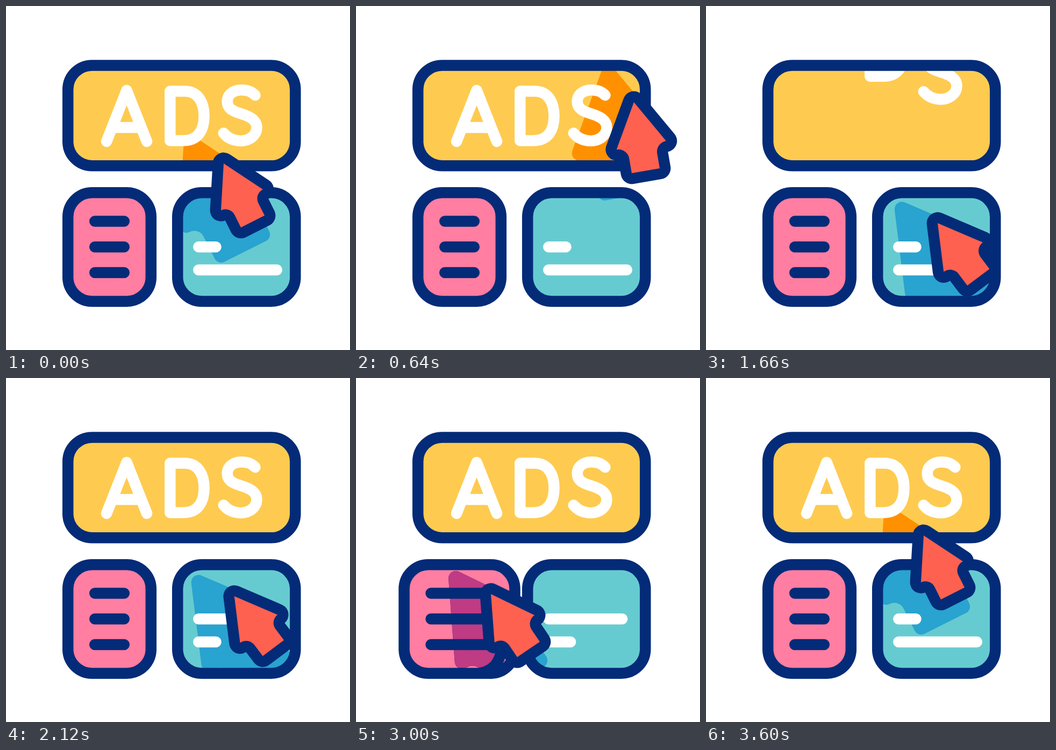
An HTML page that plays this animation: 640 px wide and 640 px high, repeating every 3620 ms.

```html
<!DOCTYPE html>
<html lang="en">
<head>
<meta charset="utf-8">
<title>Ads</title>
<style>
html, body { margin: 0; width: 100%; height: 100%; overflow: hidden; background: #fff; }
svg { display: block; width: 100vw; height: 100vh; }
.frame, .word, .bar { fill: none; stroke-width: 20.5; stroke-linecap: round; stroke-linejoin: round; }
.frame, .navy { stroke: #042b78; }
.word, .white { stroke: #fff; }
.shade { fill: currentColor; stroke: currentColor; stroke-width: 27.2; stroke-linejoin: round; }
</style>
</head>
<body>
<svg viewBox="0 0 640 640" role="img" aria-label="ADS">
  <defs>
    <rect id="banner" x="115.2" y="110.4" width="423.1" height="186.9" rx="45"/>
    <rect id="list" y="347.2" height="202.2" rx="45"/>
    <rect id="card" x="319.2" y="347.2" width="219.1" height="202.2" rx="45"/>
    <clipPath id="inBanner"><use href="#banner"/></clipPath>
    <clipPath id="inCard"><use href="#card"/></clipPath>
    <!-- The list shade keeps the resting outline while the list widens. -->
    <clipPath id="listEdge"><rect x="105" y="337" width="175" height="222.6" rx="55"/></clipPath>
    <clipPath id="listInside"><rect x="125.4" y="357.4" width="134.2" height="181.8" rx="35"/></clipPath>
    <path id="shadow"/>
  </defs>
  <rect width="640" height="640" fill="#fff"/>

  <use href="#banner" fill="#fecb50"/>
  <g clip-path="url(#inBanner)">
    <use href="#shadow" class="shade" color="#ff9100"/>
    <g class="word">
      <path class="letter" d="M187 252L224.5 157L262 252M199 226H250"/>
      <path class="letter" d="M305.3 158.5V250.5H330C358 250.5 368.5 230 368.5 205C368.5 180 358 158.5 332 158.5Z"/>
      <path class="letter" d="M463.5 166C457 159 447 156 436.5 156.3C421 157 411.5 166 411.7 178C412 190 420 195 436 200C456 206 466.5 213 466.5 226C466.5 241 452 251 437 251C423 251 412 245 404.8 236.5"/>
    </g>
  </g>
  <use href="#banner" class="frame"/>

  <use href="#list" fill="#ff7ea1"/>
  <g clip-path="url(#listEdge)"><use href="#shadow" class="shade" color="#042b78"/></g>
  <g clip-path="url(#listInside)"><use href="#shadow" class="shade" color="#bf3b84"/></g>
  <path id="rows" class="bar navy"/>
  <use href="#list" class="frame"/>

  <use href="#card" fill="#66cbd0"/>
  <g clip-path="url(#inCard)"><use href="#shadow" class="shade" color="#29a3cf"/></g>
  <path id="lines" class="bar white"/>
  <use href="#card" class="frame"/>

  <g id="cursor">
    <path class="arrow" fill="#042b78" stroke="#042b78" stroke-width="40.8" stroke-linejoin="round"/>
    <path class="arrow" fill="#ff6150"/>
  </g>
</svg>
<script>
const LOOP = 3620;
const $ = id => document.getElementById(id);
const letters = document.querySelectorAll('.letter');
const arrows = document.querySelectorAll('.arrow');

// Places where the pointer rests: tip and tilt.
const home = { x: 405, y: 293, tilt: 26.6 };
const onBanner = { x: 517, y: 179, tilt: 9.8 };
const onCard = { x: 431, y: 404, tilt: 37 };
const onList = { x: 251, y: 402, tilt: 34.2 };

const moves = [
  { from: home, to: onBanner, start: 0, time: 600, bow: 0 },
  { from: onBanner, to: onCard, start: 956, time: 526, bow: -8 },
  { from: onCard, to: onList, start: 2043, time: 657, bow: -20 },
  { from: onList, to: home, start: 3170, time: 430, bow: 60 }
];
const clicks = [640, 1553, 2860];

function ease(t, start, time) {
  const p = Math.min(1, Math.max(0, (t - start) / time));
  return (1 - Math.cos(Math.PI * p)) / 2;
}

const mix = (a, b, p) => a + (b - a) * p;

// Each move follows a straight line bent sideways by its bow.
function pose(t) {
  const { from, to, start, time, bow } = moves.filter(m => m.start <= t).pop();
  const e = ease(t, start, time);
  const dx = to.x - from.x, dy = to.y - from.y;
  const side = bow * Math.sin(Math.PI * e) / Math.hypot(dx, dy);
  return {
    x: from.x + dx * e - dy * side,
    y: from.y + dy * e + dx * side,
    tilt: mix(from.tilt, to.tilt, e ** 1.6)
  };
}

function size(t) {
  return clicks.reduce((s, c) => s + .067 * Math.exp(-(((t - c) / 155) ** 2)), .933);
}

function arrow(k) {
  const at = (x, y) => (x * k).toFixed(2) + ' ' + (y * k).toFixed(2);
  const bend = `A${at(20.3, 20.3)} 0 0 0 `;
  return `M0 0L${at(46.7, 81.2)}${bend}${at(26.4, 101.5)}L${at(26.4, 129.3)}` +
    `L${at(-26.4, 129.3)}L${at(-26.4, 101.5)}${bend}${at(-46.7, 81.2)}Z`;
}

function draw(t) {
  const { x, y, tilt } = pose(t), scale = size(t);
  const place = `translate(${x} ${y}) rotate(${-tilt})`;
  $('cursor').setAttribute('transform', place);
  arrows.forEach(a => a.setAttribute('d', arrow(scale)));
  $('shadow').setAttribute('transform', place + ' translate(-37.5 -61)');
  $('shadow').setAttribute('d', arrow(1.65 + (scale - .95) * .8));

  letters.forEach((l, i) => {
    const lift = 150 * (ease(t, 1070 - 10 * i, 440) - ease(t, 1630 - 58 * i, 300));
    l.setAttribute('transform', `translate(0 ${-lift})`);
  });

  const grow = 25.7 * (ease(t, 2600, 340) - ease(t, 3000, 240));
  $('list').setAttribute('x', 115.2 - grow);
  $('list').setAttribute('width', 154.6 + 2 * grow);
  $('rows').setAttribute('d', [-1, 0, 1]
    .map(n => `M${165.2 - grow} ${448.3 + 47.8 * n}H${219.8 + grow}`).join(''));

  const swap = 113.3 * (ease(t, 1720, 400) - ease(t, 2945, 315));
  $('lines').setAttribute('d', `M358.3 448.3H${390.5 + swap}M358.3 491H${503.8 - swap}`);
}

function tick(now) {
  draw(now % LOOP);
  requestAnimationFrame(tick);
}
draw(0);
requestAnimationFrame(tick);
</script>
</body>
</html>
```
